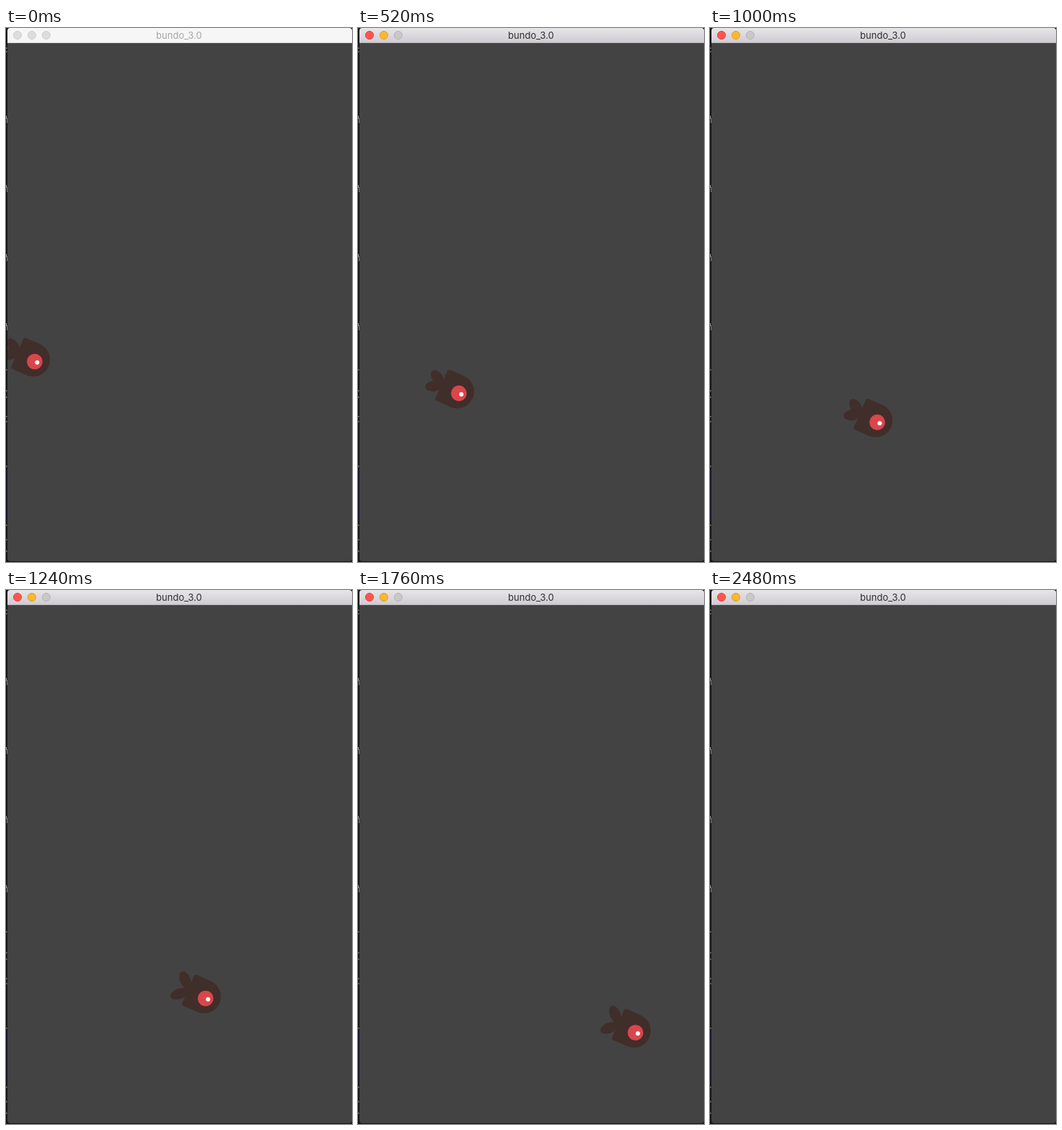
An HTML page with a canvas that plays this animation: 482x742 px, repeating every 3200 ms.

```html
<!DOCTYPE html>
<html lang="en">
<head>
<meta charset="utf-8">
<style>
  html, body { margin: 0; width: 100%; height: 100%; overflow: hidden; background: #151515; }
  canvas { display: block; }
</style>
</head>
<body>
<canvas id="stage" width="482" height="742"></canvas>
<script>
const ctx = document.getElementById('stage').getContext('2d');
const LOOP = 3200, STEP = 40, START = 80, EXIT = 2480;
const FLAP = 250, FLAP_PHASE = 210;
const HEADING = 23.6 * Math.PI / 180;

// time, x, y of the eye
const route = [
  [0, 40, 463.5], [280, 93, 487], [760, 188, 528.3], [1240, 278, 567.5],
  [1760, 386.5, 615], [2120, 456, 645.5], [2480, 528, 677]
];

const body = new Path2D('M-21 -23.5H0A23.5 23.5 0 0 1 0 23.5H-21Q-24 23.5 -24 20.5V-20.5Q-24 -23.5 -21 -23.5Z');
const fin = new Path2D('M0 -2C9 -9 20 -9 27 -3Q29 1 26 4C18 9 8 8 0 2Z');

function eyeAt(t) {
  const i = Math.max(1, route.findIndex(p => p[0] >= t));
  const [t0, x0, y0] = route[i - 1], [t1, x1, y1] = route[i];
  const k = (t - t0) / (t1 - t0);
  return [x0 + (x1 - x0) * k, y0 + (y1 - y0) * k];
}

function dot(x, y, r, fill, stroke) {
  ctx.beginPath();
  ctx.arc(x, y, r, 0, 7);
  ctx.fillStyle = fill;
  ctx.fill();
  if (stroke) {
    ctx.strokeStyle = stroke;
    ctx.stroke();
  }
}

function rect(x, y, w, h, fill) {
  ctx.fillStyle = fill;
  ctx.fillRect(x, y, w, h);
}

function drawDesktop() {
  rect(0, 0, 482, 742, '#151515');
  rect(0, 610, 2, 76, '#17162b');
  for (const y of [122, 218, 314, 410]) {
    rect(0, y, 1, 4, '#999');
    rect(1, y + 3, 1, 7, '#777');
  }
  for (const y of [27, 32, 474, 503, 512, 539, 546, 608, 690, 710, 726]) rect(0, y, 1.5, 2, '#666');
}

function drawWindow(active) {
  ctx.save();
  ctx.beginPath();
  ctx.roundRect(2, 0, 480, 741, 4);
  ctx.clip();
  rect(2, 0, 480, 742, '#434343');
  const bar = ctx.createLinearGradient(0, 0, 0, 20);
  bar.addColorStop(0, active ? '#e7e5e8' : '#f6f6f6');
  bar.addColorStop(1, active ? '#cfcdd1' : '#f6f6f6');
  rect(2, 0, 480, 20, bar);
  rect(2, 20, 480, 1, active ? '#b4b2b6' : '#dadada');
  const lights = active
    ? [['#fc5550', '#e2443f'], ['#fdb534', '#dfa023'], ['#c9c7cb', '#b5b3b7']]
    : Array(3).fill(['#dcdcdc', '#d0d0d0']);
  lights.forEach(([fill, edge], i) => dot(16 + 20 * i, 10, 5.6, fill, edge));
  ctx.font = '13px Inter, Roboto, sans-serif';
  ctx.textAlign = 'center';
  ctx.fillStyle = active ? '#2e2d2f' : '#a5a5a5';
  ctx.fillText('bundo_3.0', 241, 15);
  ctx.restore();
}

function drawFish(t) {
  const [x, y] = eyeAt(t);
  const open = Math.floor((t - FLAP_PHASE + 2 * FLAP) / FLAP) % 2 === 0;
  ctx.save();
  ctx.beginPath();
  ctx.rect(2, 21, 480, 720);
  ctx.clip();
  ctx.translate(x - 2.2, y - 2.7);
  ctx.rotate(HEADING);
  ctx.fillStyle = '#402e2a';
  ctx.fill(body);
  for (const side of [-1, 1]) {
    ctx.save();
    ctx.translate(-22, 0);
    ctx.scale(-1, side);
    ctx.rotate(open ? 0.76 : 0.53);
    if (!open) ctx.scale(0.88, 1);
    ctx.fill(fin);
    ctx.restore();
  }
  ctx.restore();
  dot(x, y, 10.8, '#d9464b');
  dot(x + 3.4, y + 1.3, 3, '#fff');
}

function frame(now) {
  const tick = Math.floor(now % LOOP / STEP) * STEP;
  const t = tick < START ? 0 : tick;
  drawDesktop();
  drawWindow(t >= START);
  if (t < EXIT) drawFish(t);
  requestAnimationFrame(frame);
}
requestAnimationFrame(frame);
</script>
</body>
</html>
```
